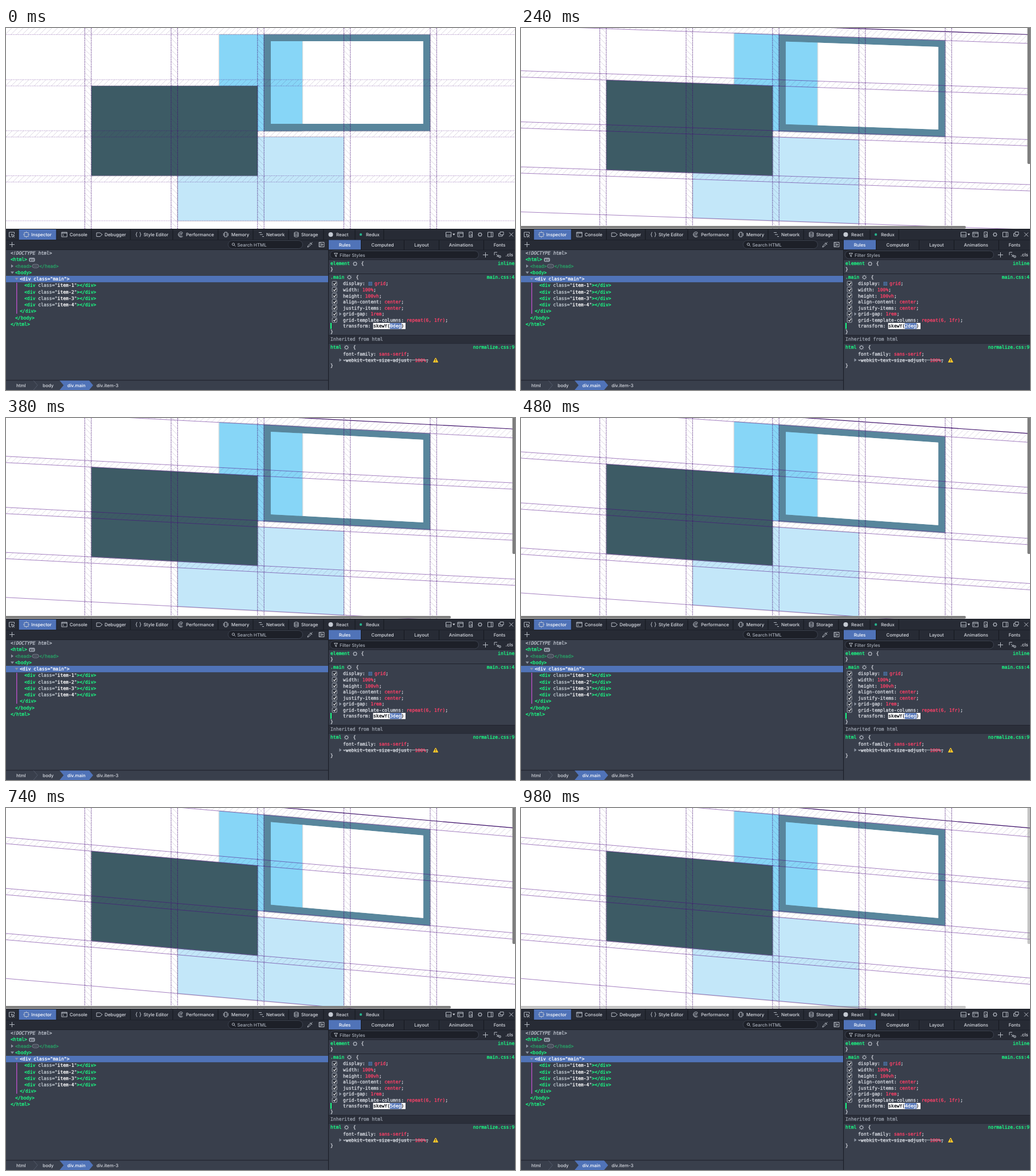
Write an HTML page that moves like this. It is 888 px wide and 631 px high and loops after 1 s.

```html
<!DOCTYPE html>
<html lang="en">
<head>
<meta charset="utf-8">
<title>Grid skew</title>
<style>
html, body { margin: 0; width: 100%; height: 100%; overflow: hidden; background: #fff; }
svg { display: block; }
text { font: 8px "DejaVu Sans Mono", monospace; white-space: pre; text-rendering: geometricPrecision; stroke-width: .3; }
.ui { font: 500 7.9px Inter, Roboto, sans-serif; }
.icon * { fill: none; stroke: #c5cad3; stroke-width: .9; }
.item { filter: drop-shadow(0 .7px 1.2px rgba(0, 0, 0, .4)); }
</style>
</head>
<body>
<svg id="stage" width="888" height="631" viewBox="0 0 888 631">
  <defs>
    <pattern id="rowHatch" width="10" height="10" patternUnits="userSpaceOnUse">
      <path d="M-1 11L11 -1" stroke="#3c1a60" stroke-width=".7" opacity=".25"/>
    </pattern>
    <pattern id="colHatch" width="10" height="10" patternUnits="userSpaceOnUse">
      <path d="M-1 -1L11 11" stroke="#3c1a60" stroke-width=".7" opacity=".25"/>
    </pattern>
    <clipPath id="page"><rect width="888" height="350"/></clipPath>
    <clipPath id="outside"><path clip-rule="evenodd" d="M440 0h310v190h-310zM462 23v144h266v-144z"/></clipPath>
  </defs>
  <g clip-path="url(#page)">
    <g id="skewed">
      <rect class="item" x="372" y="11.5" width="145" height="168" fill="#87d6f7"/>
      <rect class="item" x="299.5" y="190" width="290" height="146" fill="#c3e7f9"/>
      <g clip-path="url(#outside)">
        <path class="item" fill="#58869c" fill-rule="evenodd" d="M450 11.5h290v168h-290zM462 23v144h266v-144z"/>
      </g>
      <rect class="item" x="149" y="101" width="290" height="156.5" fill="#3d5b65"/>
      <g id="rows"></g>
    </g>
    <g id="cols"></g>
    <g id="bars" fill="#7d7d7d">
      <rect x="883.5" y="-4" width="5" height="241" rx="2"/>
      <rect x="-4" y="345" width="780" height="4.5" rx="2"/>
    </g>
  </g>
  <g id="tools"></g>
</svg>
<script>
const $ = id => document.getElementById(id);
const dark = '#272b35', panel = '#393f4c', edge = '#1c1f28', blue = '#5073b8',
  pale = '#d9dce3', green = '#1aff86', dim = '#299f66', red = '#ff4168', white = '#fff';

const rect = (x, y, w, h, fill, more = '') =>
  `<rect x="${x}" y="${y}" width="${w}" height="${h}" fill="${fill}" ${more}/>`;
const path = (d, more = '') => `<path d="${d}" ${more}/>`;
const icon = d => `<g class="icon">${path(d)}</g>`;
const label = (s, x, y, fill = pale, more = '') =>
  `<text class="ui" x="${x}" y="${y}" fill="${fill}" ${more}>${s}</text>`;
const esc = s => s.replace(/&/g, '&amp;').replace(/</g, '&lt;');
// Parts alternate between text and colour.
const code = (x, y, ...parts) => {
  let out = '';
  for (let i = 0; i < parts.length; i += 2)
    out += `<tspan fill="${parts[i + 1]}" stroke="${parts[i + 1]}">${esc(parts[i])}</tspan>`;
  return `<text x="${x}" y="${y}">${out}</text>`;
};
const arrow = (x, y, open) => path(open ? `M${x} ${y}h6l-3 4z` : `M${x} ${y}v6l4 -3z`, 'fill="#8d95a3"');
const gear = (x, y) => icon(`M${x - 2.6} ${y}a2.6 2.6 0 1 0 5.2 0a2.6 2.6 0 1 0 -5.2 0M${x - 4} ${y}h1.6m4.8 0h1.6` +
  `M${x} ${y - 4}v1.6m0 4.8v1.6M${x - 3} ${y - 3}l1 1m4 4l1 1m0 -6l-1 1m-4 4l-1 1`);

function grid() {
  const gaps = [[-4, 11.5], [90, 101], [179, 190], [257.5, 268.5]];
  const lines = [11.5, 90, 101, 179, 190, 257.5, 268.5, 336];
  $('rows').innerHTML =
    gaps.map(([a, b]) => rect(0, a, 888, b - a, 'url(#rowHatch)')).join('') +
    path('M0 -4H888', 'stroke="#3a0a66" stroke-width="1.2"') +
    '<g id="rowLines" stroke="#4b0082" stroke-width=".8">' +
    lines.map(y => path(`M0 ${y}H888`)).join('') + '</g>';
  const cols = [137.4, 288, 438.8, 589.4, 740];
  $('cols').innerHTML = cols.map(x => rect(x, 0, 11.4, 350, 'url(#colHatch)') +
    path(`M${x} 0V350M${x + 11.4} 0V350`, 'stroke="#3f0a70" stroke-width=".9" stroke-dasharray="1.6 1.4"')).join('');
}

function toolbar() {
  let s = rect(0, 350, 888, 281, panel) + rect(0, 350, 888, 19, dark) + rect(0, 350, 888, 1, '#15171e') +
    rect(22, 351, 66, 18, blue) + rect(0, 369, 888, 1, edge);
  const tabs = [['Inspector', 44], ['Console', 111], ['Debugger', 172], ['Style Editor', 240], ['Performance', 314],
    ['Memory', 393], ['Network', 454], ['Storage', 515], ['React', 576], ['Redux', 628]];
  for (const [name, x] of tabs) s += label(name, x, 363, name === 'Inspector' ? white : pale);
  for (const x of [22, 88, 149, 217, 291, 370, 431, 493, 554, 609, 659]) s += rect(x - .5, 351, 1, 18, '#15181f');
  s += icon('M9 364H5.5V356H14.5V359M9 359l6 2.5l-2.5 1l-1 2.5zM12.5 362.5l2.5 2.5') +
    icon('M32 356.5h7v7h-7zM30 360h2m7 0h2M35.5 354.5v2m0 7v2') +
    icon('M97 356h9.5v8H97zM97 357.5h9.5M99 359.5l1.6 1.5l-1.6 1.5') +
    icon('M158 357h6l4 3l-4 3.5h-6z') +
    icon('M229 356q-1.5 0 -1.3 2q0 2 -1.2 2q1.2 0 1.2 2q-.2 2 1.3 2M233 356q1.5 0 1.3 2q0 2 1.2 2q-1.2 0 -1.2 2q.2 2 -1.3 2') +
    icon('M308.5 357a4.5 4.5 0 1 0 0 6M307 359.5a2.5 2.5 0 1 0 0 2M304 361l4 -3.5') +
    icon('M381.5 356h4v8h-4zM379.5 357.5v5m8 -5v5') +
    icon('M441 356.5h5m-3 3.5h5m-1 3.5h3') +
    icon('M503 356.5q3.5 -1.5 7 0v7q-3.5 1.5 -7 0zM503 358.5q3.5 1.5 7 0M503 361q3.5 1.5 7 0') +
    '<circle cx="566.5" cy="360" r="4" fill="#c5cad3"/><circle cx="619" cy="360" r="2.2" fill="#27b08b"/>' +
    icon('M767.5 356h9v8h-9zM767.5 361h9') + path('M779 358.5h4.5l-2.2 3z', `fill="${pale}"`) +
    icon('M788 356h9.5v8H788zM788 358h9.5M790 360l1.5 1.2l-1.5 1.2') +
    icon('M808 355.5h5.5v9H808zM808 362h5.5M810 358.5l3 2') + gear(827, 360) +
    icon('M840.5 356h9v8h-9zM846.5 356v8') + icon('M862 355.5h6v5h-6zM862 358h-2.5v5h6.5v-2.5') +
    icon('M878 356.5l7 7m0 -7l-7 7');
  return s;
}

function markup() {
  let s = rect(0, 370, 562, 16, dark) + rect(0, 386, 562, 1, edge) +
    icon('M6 377.5h9M10.5 373v9') +
    rect(387.5, 370.5, 130, 14, '#1d2028', 'rx="7" stroke="#454b59" stroke-width=".8"') +
    icon('M394.5 377a2.1 2.1 0 1 0 4.2 0a2.1 2.1 0 1 0 -4.2 0M398.2 378.5l2.3 2.3') +
    label('Search HTML', 403.5, 380.6, '#a9afba', 'font-weight="400"') +
    icon('M526 382l1 -2.5l4.5 -4.5l1.5 1.5l-4.5 4.5zM530.5 374l3.5 3.5M532.5 375.5l2 -2') +
    icon('M546 373.5h9v8h-9zM548 373.5v8M550.5 375.8v3.6l2.8 -1.8z');
  const y = n => +(395.2 + n * 11.23).toFixed(2);
  const soft = '#c3ccd3';
  s += rect(0, 432, 562, 11.2, blue);
  s += code(8, y(0), '<!DOCTYPE html>', '#bcc2cc').replace('<text', '<text style="font-style:italic"');
  s += code(8, y(1), '<html>', green) + rect(40, 400.5, 10.5, 7, '#9aa1ad', 'rx="2"') +
    '<text x="41.6" y="406.3" style="font-size:6px;font-weight:bold" fill="#2b303b">ev</text>';
  s += arrow(9, 412, false) + code(16, y(2), '<head>', dim) +
    rect(46, 412, 11, 6, 'none', 'rx="3" stroke="#929aa7" stroke-width=".8"') +
    path('M48.5 415h6', 'stroke="#b7bec9" stroke-dasharray="1 1.4"') + code(58, y(2), '</head>', dim);
  s += arrow(8, 424.5, true) + code(16, y(3), '<body>', green) + arrow(15.5, 435.5, true) +
    code(24, y(4), '<div class="main">', white);
  for (let i = 1; i < 5; i++)
    s += code(32, y(4 + i), '<div ', green, 'class', soft, '="', soft, 'item-' + i, white, '"', soft, '></div>', green);
  s += rect(18, 444, 1.4, 54, '#b850c8') + code(24, y(9), '</div>', green) +
    code(16, y(10), '</body>', green) + code(8, y(11), '</html>', green);
  s += rect(0, 613.5, 562, 1, edge) +
    path('M93.5 614.5H145l7 8.2l-7 8.3H93.5l7 -8.3z', `fill="${blue}"`) +
    path('M48 614.5l7 8.2l-7 8.3', 'fill="none" stroke="#5a6171" stroke-width=".8"') +
    label('html', 18, 626) + label('body', 64, 626) + label('div.main', 107, 626, white) + label('div.item-3', 158, 626);
  return s;
}

function rules() {
  let s = rect(562, 370, 1.2, 261, edge) + rect(563, 370, 325, 17, dark) + rect(563, 369.5, 56, 17, blue) +
    rect(563, 386.5, 325, 17.5, dark) + rect(563, 386.5, 325, .8, edge) + rect(563, 403.5, 325, .8, edge);
  [['Rules', 591], ['Computed', 657], ['Layout', 725], ['Animations', 794], ['Fonts', 861]].forEach(([name, x], i) =>
    s += label(name, x, 381, i ? pale : white, 'text-anchor="middle"'));
  for (const x of [619, 694, 755, 833]) s += rect(x, 370, 1, 17, '#15181f');
  s += rect(565.5, 388.5, 259, 13.5, '#1d2028', 'rx="6.7" stroke="#454b59" stroke-width=".8"') +
    icon('M572.5 392.5h6l-2.2 3v3.2l-1.6 -1v-2.2z') + label('Filter Styles', 582, 398.5, '#a9afba', 'font-weight="400"') +
    icon('M832 395.5h9M836.5 391v9') + icon('M852 391h5m-5 0v5M855 394l4 4v-3m0 3h-3M860 397h3v3h-3z') + label('.cls', 871.5, 398, pale);

  const right = (t, y) => `<text x="887" y="${y}" text-anchor="end" fill="${green}" stroke="${green}">${t}</text>`;
  const prop = (y, name, value) => code(588, y, name, pale, ': ', pale, value, red, ';', pale);
  s += code(566, 413.3, 'element', green) + gear(609, 411) + code(619.5, 413.3, '{', pale) + right('inline', 413.3) +
    code(566, 423, '}', pale) + rect(563, 428, 325, .9, edge) +
    code(566, 437, '.main', green) + gear(599, 434.5) + code(610.5, 437, '{', pale) + right('main.css:4', 437);
  const props = [['width', '100%'], ['height', '100vh'], ['align-content', 'center'],
    ['justify-items', 'center'], ['grid-gap', '1rem'], ['grid-template-columns', 'repeat(6, 1fr)']];
  const y = n => +(448.4 + n * 10.57).toFixed(2);
  s += code(588, y(0), 'display:', pale) + code(643, y(0), 'grid', red, ';', pale) +
    rect(632.5, 442.6, 6.4, 6.4, '#4f80bd') + path('M634.8 442.6v6.4m2.1 -6.4v6.4M632.5 444.8h6.4m-6.4 2.1h6.4', `stroke="${panel}" stroke-width=".6"`);
  props.forEach(([k, v], i) => s += prop(y(i + 1), k, v));
  for (let i = 0; i < 7; i++)
    s += rect(569.2, y(i) - 6.8, 8, 8, '#2b303b', 'rx="1" stroke="#c5cad3" stroke-width=".8"') +
      path(`M571 ${y(i) - 2.8}l2 2l3 -4.2`, 'fill="none" stroke="#fff" stroke-width="1.1"');
  s += arrow(581.5, y(5) - 5.8, false);
  s += rect(566, 514, 2, 10.5, green) + code(588, y(7), 'transform:', pale) + rect(640.5, 514, 56.5, 10.8, white) +
    rect(669.8, 514.3, 20.2, 10.2, blue) + code(641, y(7), 'skewY(', '#14161c') +
    `<text id="angle" x="670" y="${y(7)}" fill="#fff" stroke="#fff"></text>` + code(689.4, y(7), ')', '#14161c');
  s += code(566, 532, '}', pale) + rect(563, 535.5, 325, 14, '#2b2f3a') + rect(563, 535, 325, .8, edge) +
    rect(563, 549.5, 325, .8, edge) + code(566, 545.2, 'Inherited from html', '#9aa1ad');
  s += code(566, 559.2, 'html', green) + gear(594, 556.8) + code(605.5, 559.2, '{', pale) + right('normalize.css:9', 559.2) +
    prop(571, 'font-family', 'sans-serif') + arrow(581.5, 575.7, false) +
    prop(581.5, '-webkit-text-size-adjust', '100%') + rect(588, 578.4, 149, .8, '#c6ccd5') +
    path('M749.5 575l4 7.5h-8z', 'fill="#ffc928" stroke="#ffc928" stroke-linejoin="round"') +
    path('M749.5 577v2.8m0 1v1', 'stroke="#2b303b" stroke-width="1"') + code(566, 591, '}', pale);
  return s;
}

grid();
$('tools').innerHTML = toolbar() + markup() + rules();

// The typed angle changes first; the page follows a moment later.
const steps = [40, 160, 300, 420, 540];
const count = t => steps.filter(s => t >= s).length;
const start = performance.now();

function draw() {
  const t = Math.max(0, performance.now() - start) % 1000;
  const deg = count(t - 20);
  $('angle').textContent = (t >= 980 ? 4 : count(t)) + 'deg';
  $('skewed').setAttribute('transform', `translate(444 0) skewY(${deg}) translate(-444 0)`);
  $('rowLines').setAttribute('stroke-dasharray', deg ? 'none' : '1.6 1.4');
  $('rowLines').setAttribute('opacity', deg ? .62 : .5);
  $('bars').setAttribute('opacity', deg ? 1 - .55 * Math.min(1, Math.max(0, (t - 900) / 80)) : 0);
  requestAnimationFrame(draw);
}
draw();
</script>
</body>
</html>
```
